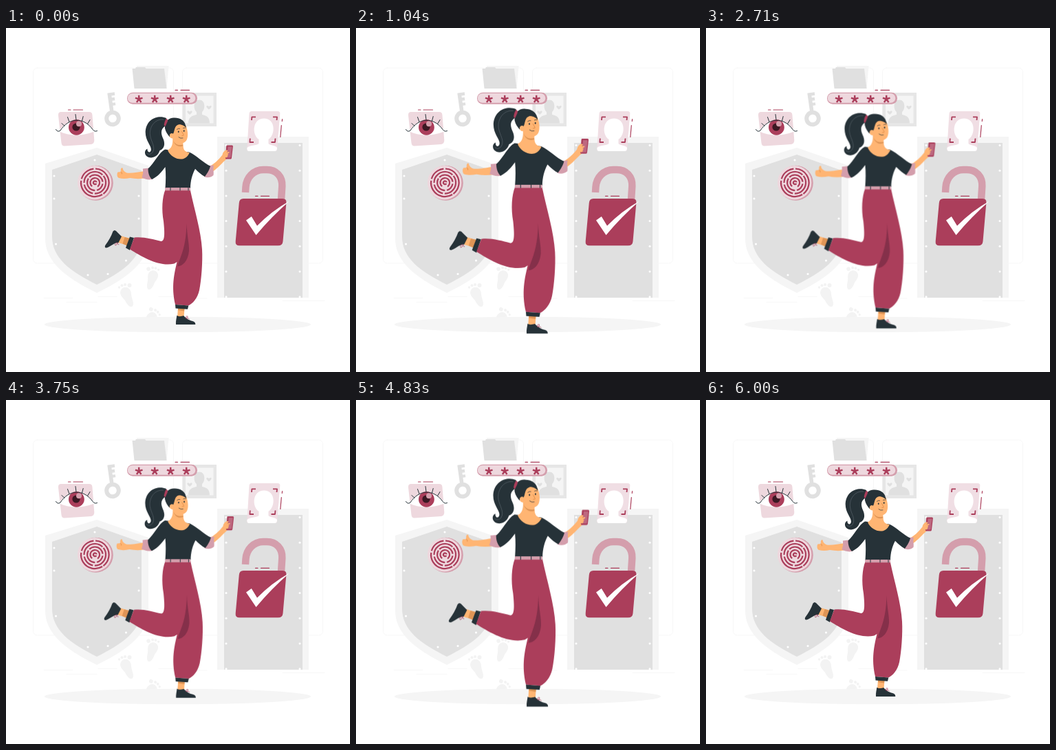
An HTML page for the animation above (6.04 s loop, 500 by 500 pixels).

```html
<!DOCTYPE html>
<html lang="en">
<head>
<meta charset="utf-8">
<title>Secure sign-in</title>
<style>
  html, body { margin: 0; width: 100%; height: 100%; overflow: hidden; background: #fff; }
  svg { display: block; width: 100vw; height: 100vh; }
  .main { fill: #ab3e5b; }
  .mid { fill: #d49eac; }
  .pale { fill: #eed8de; }
  .card { fill: #f0dee4; }
  .dark { fill: #263238; }
  .skin { fill: #ffb573; }
  .tan { fill: #df9556; }
  .grey { fill: #e0e0e0; }
  .light { fill: #f5f5f5; }
  .white { fill: #fff; }
  .line, .ink, .crease, .faint { fill: none; stroke-linecap: round; stroke-linejoin: round; }
  .line { stroke: #ab3e5b; stroke-width: 1.2; }
  .ink { stroke: #263238; stroke-width: 1; }
  .crease { stroke: #d9843f; stroke-width: .7; }
  .faint { stroke: #f5f5f5; stroke-width: .8; }
  .thin { stroke-width: .7; }
  .star { stroke-width: 2.5; stroke-linecap: butt; }
  .corner { stroke-width: 1.8; stroke-linecap: butt; }
  .ridge { stroke-width: 2.2; stroke-linecap: butt; }
  #woman { transform-box: view-box; transform-origin: 236.2px 281px; animation: pulse 6.04s linear infinite; }
  @keyframes pulse {
    0%, 59.603%, 99.338%, 100% { transform: scale(1); }
    19.868%, 79.47% { transform: scale(1.1); }
  }
</style>
</head>
<body>
<svg viewBox="0 0 500 500" xmlns="http://www.w3.org/2000/svg">
  <defs>
    <path id="star" class="line star" d="M0 0V-5.6M0 0L5.3-1.7M0 0L3.3 4.6M0 0L-3.3 4.6M0 0L-5.3-1.7"/>
    <g id="foot" fill="#f3f3f3">
      <path d="M-8-7C-4-14 6-12 7-2C7 5 12 11 9 16.5C5 19 1 14-2 8C-6 3-11-1-8-7Z"/>
      <circle cx="-10.5" cy="-11" r="1.7"/><circle cx="-6.5" cy="-13.8" r="2"/><circle cx="-2" cy="-15" r="2.1"/><circle cx="4.5" cy="-14" r="3"/>
    </g>
    <path id="heart" class="grey" d="M0 3C-5 0-4-3-1.8-2.6Q-.4-2.4 0-1Q.4-2.4 1.8-2.6C4-3 5 0 0 3Z"/>
  </defs>

  <!-- backdrop -->
  <rect class="faint" x="39.5" y="58" width="204" height="284" rx="6"/>
  <rect class="faint" x="256.5" y="58" width="204" height="284" rx="6"/>
  <path class="faint" d="M55 392.5H97M88 398.5H132M134 390.5H161M222 390.5H246M258 393H292M402 396.5H463"/>

  <path class="light" d="M190 55H236.5L233.5 88H192Z"/>
  <path class="grey" d="M183.5 59H188L189 57H202L203.5 59H230L233.5 88H186.5Z"/>

  <rect x="256.5" y="94" width="49.5" height="49" fill="#e6e6e6"/>
  <rect x="261" y="98.5" width="40.5" height="40" fill="#f5f5f5"/>
  <path class="grey" d="M265 138.5C265 129 271 127.5 277 126V122C272 118 272 104.5 281 104.5C290 104.5 290 118 285 122V126C291 127.5 296 129 296 138.5Z"/>
  <use href="#heart" x="267" y="123"/><use href="#heart" x="295" y="115.5"/>

  <g transform="rotate(-8 155 131.5)">
    <circle cx="155" cy="131.5" r="8.8" fill="none" stroke="#e0e0e0" stroke-width="6"/>
    <path class="grey" d="M152.5 121V94H163V98.5H158V101.5H162V106H158V109H162V113H158V121Z"/>
  </g>

  <path class="light" d="M132 174L207 200V306C207 340 177 363 132 385C87 363 57 340 57 306V197Z"/>
  <path class="grey" d="M132 184L197 207V303C197 335 170 354 132 373C94 354 67 335 67 303V206Z"/>
  <path class="light" d="M307 158H440V392H307Z"/>
  <path class="grey" d="M317 167H431V392H317Z"/>
  <g id="rivets" class="white"></g>

  <use href="#foot" transform="translate(175 388)"/>
  <use href="#foot" transform="matrix(-.95 .12 .12 .95 213 363)"/>
  <use href="#foot" transform="matrix(-.9 -.35 -.35 .9 210 423)"/>
  <ellipse class="light" cx="249.5" cy="431" rx="193.6" ry="11.3"/>

  <!-- eye -->
  <path class="pale" d="M80 122H121Q125 122 125.4 126L128.3 163Q128.5 168 124 169L85 171.5Q81 171.5 80.5 167L76 127Q75.7 122 80 122Z"/>
  <path class="white" d="M77 150C89 131 115 129 129 150C115 156.5 93 158.5 77 150Z"/>
  <circle class="main" cx="102.4" cy="144.3" r="11.4"/>
  <circle cx="102" cy="144" r="5.6" fill="#3b1823"/>
  <circle class="mid" cx="106" cy="139.3" r="4"/>
  <path class="ink" d="M72.5 147.5Q75 152 79 149C91 130 113 129 126 147.5Q129 151.5 132.5 149.5M85 142.5L81 138.5M92 136.5L89.5 129.5M102 133.5L101 125.5M110.5 135L112.2 128.5M118.5 139.5L122 133.5"/>
  <path class="line" d="M90.5 119H94M98 119H111.5"/>

  <!-- password -->
  <rect class="mid" x="176" y="93.7" width="102" height="17" rx="8.3"/>
  <rect class="pale" x="176.8" y="95" width="98.5" height="13.8" rx="6.9"/>
  <use href="#star" x="193.2" y="103.3"/><use href="#star" x="216.2" y="103.3"/><use href="#star" x="239.2" y="103.3"/><use href="#star" x="262.2" y="103.3"/>
  <path class="line" d="M246 90.3H249.5M254 90.3H266.5"/>

  <!-- face scan -->
  <path class="card" d="M357 121H395Q398.5 121 398.3 124.5L394 176Q393.7 179 390.5 179H353Q350 179 350.3 176L353.5 124.5Q353.8 121 357 121Z"/>
  <path class="white" d="M350.4 174C354 170.5 364 171 367.5 168V162C357 155 358 131.5 375 131.5C392 131.5 392 155 381.5 162V168C384 171 392 170.5 394 174L393.8 176Q393.5 179 390.5 179H353Q350 179 350.4 174Z"/>
  <path class="line corner" d="M357 134L357.4 129.3H363M388 129.3H394L393.5 134M354.8 160.5L354.4 166H360M385.5 166H391L391.5 160.5"/>
  <path class="line" d="M401.6 132.5L401.3 135.5M400.3 141.5L398.8 158.5"/>

  <!-- fingerprint -->
  <circle class="mid" cx="130.3" cy="225.3" r="25.5"/>
  <circle class="pale" cx="128.7" cy="224.7" r="24.7"/>
  <g id="print"></g>

  <!-- lock -->
  <path d="M348 239L348.5 231C349.5 217 360 206 374 206H379C393 206 402 216 401.3 230L400 250" fill="none" stroke="#d49eac" stroke-width="10.5"/>
  <path class="main" d="M345 248H402Q408 248 407.4 254L402.5 310Q402 316.3 395.5 316.3H339.5Q333 316.3 333.7 310L338.8 254Q339.3 248 345 248Z"/>
  <path class="white" d="M349 279.5L356.8 274L365 287.5Q386 266 412 251.5Q386 274 363.5 301Z"/>
  <path class="line" d="M362.5 244.3H366M370.5 244.3H382.5"/>

  <g id="woman">
    <!-- ponytail -->
    <path class="dark" d="M233 131C222 126 204.5 131 202.7 150C202 165 213 172 210.5 178.5C208.5 182.5 205 180 205.5 175.5C199.5 178 201 188.5 211 188.5C218 188 222 183 223.5 178C231 175 231.5 167 228 160C224 151 226 146 232 142Z"/>
    <path d="M229 133C215 132 208 145 209.5 156C211 166 218 173 213 181Q209 185.5 204.5 182" fill="none" stroke="#68727a" stroke-width=".5"/>

    <!-- raised leg -->
    <path class="skin" d="M167 302L180 306L177 316L163 312Z"/>
    <path class="tan" d="M172.5 304L181 306L177 317L169.5 313.5Z"/>
    <path class="dark" d="M157.5 294Q160 294 161.5 296.500L168 303L163.500 312C158 311 151 318.500 146 319.500Q142.500 319.500 144.500 315.500Q152 305.500 155.500 295.500Z"/>
    <path class="line thin" d="M161 312Q157 313 159 316Q161 316 162 312Q163 316 164 315"/>
    <path class="dark" d="M180 303.5L186 305L180 323L174 319.5Z"/>

    <!-- standing leg -->
    <path class="skin" d="M250 406H259.5L258.5 421H249Z"/>
    <path class="tan" d="M250 407H259.5L259 411.5L250 410Z"/>
    <path class="dark" d="M247 431C246.500 426.500 248 421.500 248.300 417.800C251 420 255 419 258 418C261 421.500 266 425 271 426Q275.500 427 275.300 431Z"/>
    <path class="line thin" d="M261.5 422Q261 418 264 419Q265 420.500 262 422Q266 421 266.500 423"/>

    <!-- trousers -->
    <path class="main" d="M231.5 235C227 246 226 264 229 281C230.500 296 231.500 310 225.500 310C213 307 200 303 186.500 304.500L180 321.500C198 333 223 347.500 244.500 342.500L248.500 340C244.500 357 240 376 246 402L265 403.500C271 401 278.500 393 281 381C284 366 286 340 285 322C283.500 295 274 265 267.700 235Z"/>
    <path d="M262.5 284C263 302 266.500 313 266 324C264.500 339 257 346 249.200 346.500C250.500 341 252.500 337 254 332.500C260 317 262 302 262.500 284Z" fill="#85304a"/>
    <path class="dark" d="M246 402L265.3 403.5L264 408.7L246.5 407.5Z"/>

    <!-- left arm -->
    <path class="skin" d="M204 207.5C192 209.5 182 211.5 175.5 210.5C172 209 170 207 169.5 203.5C167.5 202.5 166.3 205 167 209L162.500 209.500C160.700 212 161.500 217.500 164 218C170 219.700 175 219 180 218C188 219.500 196 219.500 205 218Z"/>
    <path class="crease" d="M167 209Q169 210 168.5 212"/>

    <!-- right arm -->
    <path class="skin" d="M293 203C302 198 309 192 314.500 184.500C315 180.500 318 177.500 321 178L325.500 180C326.500 184 324 188 320.500 190.500C314 196 309 203 300 209Z"/>
    <path class="main" d="M321.500 170.500H328.500Q330 170.600 329.900 172L327.900 189Q327.700 190.500 326.200 190.500H320Q318.700 190.400 318.900 189L320.200 171.800Q320.300 170.500 321.500 170.500Z"/>
    <path d="M322.500 172.500H328.600L326.700 188.500H321.200Z" fill="#bd6980"/>
    <path class="skin" d="M316 182C317 178.500 319 177 321.500 177.500Q323.500 178.500 320.500 180.500L324.500 180Q325.500 181.500 321.500 183Q324.500 183.500 322 185.500Q323 187 320.500 188.500L315 187Z"/>

    <path class="mid" d="M199 204.5L208 203.5L214 219C209 222 202 219.5 197.500 217.500Q200 211 199 204.500Z"/>
    <path class="mid" d="M295 200L302 199.500C300.500 205 302.500 209 301.500 214C297.500 217.500 292.500 218 287.500 216Z"/>

    <!-- top -->
    <path class="dark" d="M231 176.500C223 180 215 197 206.500 204.500C206.500 211 208.500 216.500 212 220C221 216 227 208 231.500 202C232.500 212 232.300 222 231.500 233H268C268 222 271 212 275 204.800C279.500 209.500 284.500 213.800 289 216C292.500 211.500 296 205.500 297 200.800C287 196 277 185.500 266.500 180.500Z"/>
    <path class="skin" d="M242 159C243 168 241 175 235 177.500C239 187 249 192 257.500 190.200C262 189 265.500 184.500 266.800 181C258 180 257 175 257.500 165Z"/>
    <path class="tan" d="M243 163.5C246 169.5 251 171 257 169.500L257.300 171.500C250 174 245 170 243 163.500Z"/>
    <path class="mid" d="M231.5 232H267.5L268.300 236.300H231Z"/>
    <path class="ink" d="M239 232.300V236M253 232.300V236M265 232.300V236"/>

    <!-- head -->
    <g transform="translate(1 0)">
      <path class="skin" d="M240 143C243 136 256 135 260.500 142C263 148 264.500 157 261.500 163C258.500 168 252 168.800 247.500 166C244 164 243 162 242.500 159.500C238 162 235.500 156.500 238.500 154.500Z"/>
      <path class="dark" d="M230 146C228.500 135 237 129.500 244.500 130.500C252 130.500 258 134.500 259.500 140C253 138.500 247 140 245 144.500C243 149 243.500 152.500 241 155C238 152.500 236.500 155.500 237 158.500C234 155 231 151 230 146Z"/>
      <path class="dark" d="M249 136C255 134.500 260.500 138 260.800 145C258 141.500 254 140 249 140Z"/>
      <path class="skin" d="M241.800 153.500C238.500 151.500 235.500 155 237.500 158.500C238.800 160.700 241.500 161 243 159Z"/>
      <ellipse class="dark" cx="249.700" cy="150.700" rx=".9" ry="1.300"/>
      <ellipse class="dark" cx="257.700" cy="149.600" rx=".9" ry="1.300"/>
      <path class="ink thin" d="M247.500 147.300Q249.500 145.500 251.500 146.200M256.500 145.500Q258.200 144.500 259.800 145.300M250 158.700Q252.500 161 256 160"/>
      <path class="crease" d="M254.500 150.500Q256.700 154 257.200 156Q256.200 157 254.700 156.500"/>
    </g>
    <path class="main" d="M233 131.500Q236 133 234.500 136.500Q233 140 231.500 143Q229.500 142.500 229.700 140Q230.500 135 233 131.500Z"/>
  </g>
</svg>
<script>
  const add = (id, markup) => document.getElementById(id).insertAdjacentHTML('beforeend', markup);
  const dot = (x, y) => add('rivets', `<circle cx="${x}" cy="${y}" r="1.5"/>`);

  for (let i = 0; i < 7; i++) {
    dot(320, 170.5 + i * 36.7);
    dot(427, 170.5 + i * 36.7);
  }
  [[129, 192], [70, 215], [70, 248], [72.5, 314], [119, 359], [148, 357.5], [174.5, 338], [193, 277], [193, 244]]
    .forEach(p => dot(...p));

  // Broken concentric ridges, each turned to its own angle.
  for (let i = 0; i < 5; i++) {
    const r = 2.3 + i * 4.5;
    const arc = Math.PI * r;
    const dash = i < 2 ? [arc * 1.6, arc * .4] : [arc * .72, 2.6, arc * .38, 2.6, arc * .9 - 7.8, 2.6];
    add('print', `<circle class="line ridge" cx="129.3" cy="224.8" r="${r}"
      stroke-dasharray="${dash.join(' ')}" transform="rotate(${i * 97 + 30} 129.3 224.8)"/>`);
  }
</script>
</body>
</html>
```
